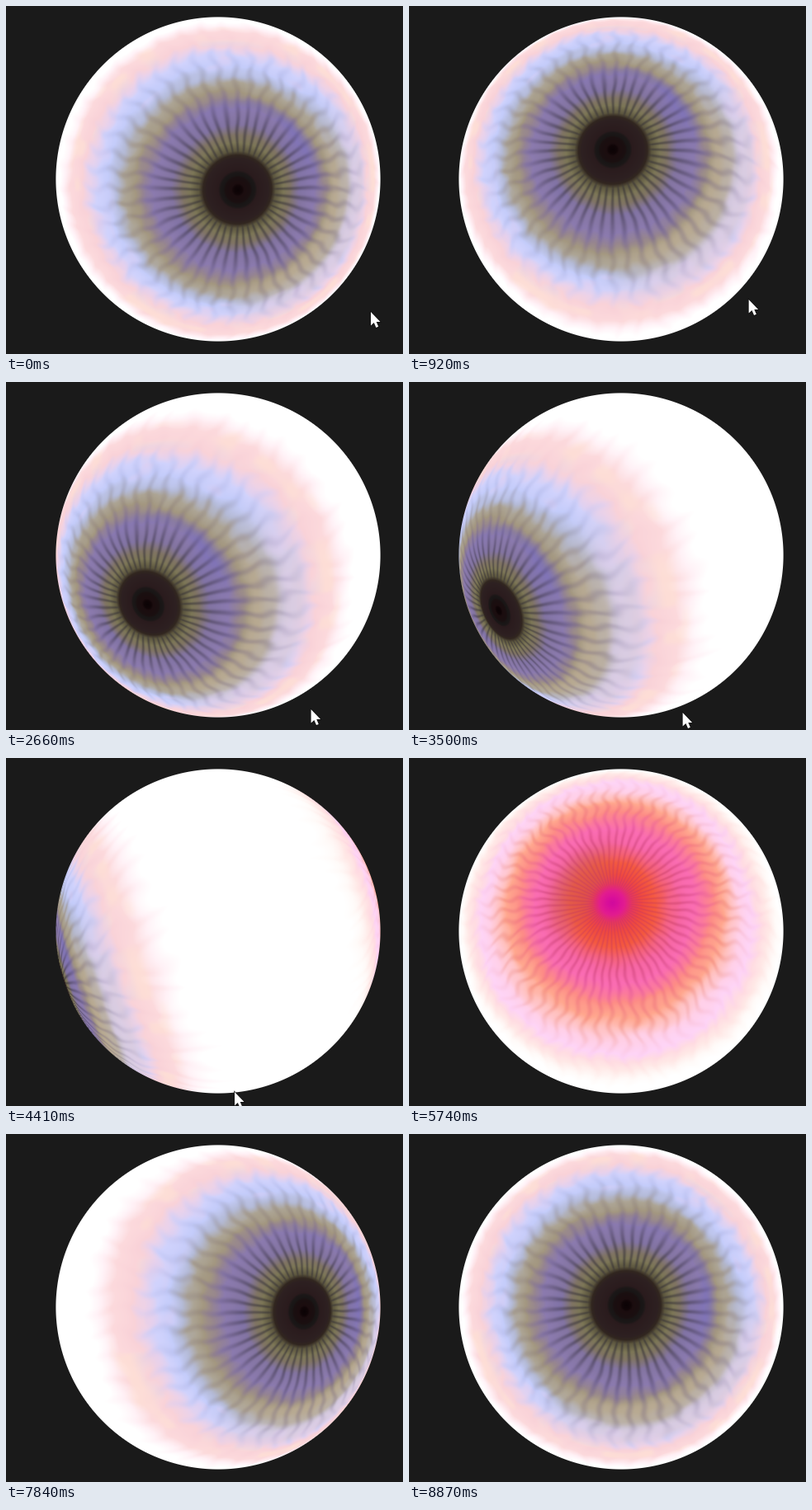
Write an HTML page with a canvas that moves like this. It is 481 by 422 pixels and loops after 9980 ms.

```html
<!DOCTYPE html>
<html lang="en">
<head>
<meta charset="utf-8">
<title>Rotating eye</title>
<style>
html, body { margin: 0; width: 100%; height: 100%; overflow: hidden; background: #1a1a1a; }
canvas { display: block; }
</style>
</head>
<body>
<canvas id="stage" width="481" height="422"></canvas>
<script>
const ctx = document.getElementById('stage').getContext('2d');
const LOOP = 9980, CX = 257, CY = 210, R = 196.6, DIST = 3.4, BG = 26;
const TAN = 1 / Math.sqrt(DIST * DIST - 1);
const X0 = 59, Y0 = 12, SIZE = 397;

// time, yaw, pitch, roll in degrees
const POSES = [[0, 5.2, 2.8, 0], [280, 7.5, 2, 0], [920, -2.1, -7.8, 0], [2660, -19.8, 13.4, 0],
  [4410, -76, 17.6, 8], [5740, -181, 7.5, 20], [7840, -336, 1.2, 32], [8870, -358.6, -0.5, 38]];
// time, x, y of the pointer tip
const POINTER = [[0, 442, 371], [280, 454, 374], [920, 412, 356], [2270, 379, 388],
  [2660, 370, 397], [4410, 277, 405], [5300, 215, 424]];
// start, end, number of picture changes
const SPANS = [[150, 1190, 9], [1340, 2270, 8], [2390, 3380, 8], [3500, 4410, 7], [4560, 5490, 8],
  [5620, 6580, 8], [6700, 7690, 9], [7840, 8230, 4], [8600, 8870, 3]];
const steps = [0];
for (const [a, b, n] of SPANS)
  for (let i = 0; i < n; i++) steps.push(a + (b - a) * i / (n - 1));

const clamp = x => x < 0 ? 0 : x > 1 ? 1 : x;
const ramp = (x, a, b) => { const u = clamp((x - a) / (b - a)); return u * u * (3 - 2 * u); };
const bump = (x, a, b, c, d) => ramp(x, a, b) * (1 - ramp(x, c, d));

// Smooth curve through timed keys
function sample(keys, t) {
  const last = keys.length - 1;
  if (t >= keys[last][0]) return keys[last].slice(1);
  let i = 0;
  while (t >= keys[i + 1][0]) i++;
  const a = keys[i], b = keys[i + 1], h = b[0] - a[0], u = (t - a[0]) / h;
  const slope = (j, c) => {
    const p = keys[Math.max(j - 1, 0)], q = keys[Math.min(j + 1, last)], k = keys[j];
    const s0 = (k[c] - p[c]) / (k[0] - p[0] || 1), s1 = (q[c] - k[c]) / (q[0] - k[0] || 1);
    return s0 * s1 > 0 ? 2 * s0 * s1 / (s0 + s1) : 0;
  };
  const u2 = u * u, u3 = u2 * u;
  return a.slice(1).map((value, j) => {
    const c = j + 1;
    return value * (2 * u3 - 3 * u2 + 1) + b[c] * (3 * u2 - 2 * u3) +
      h * (slope(i, c) * (u3 - 2 * u2 + u) + slope(i + 1, c) * (u3 - u2));
  });
}

// Colour tables indexed by distance from the pole
function palette(text) {
  const stops = text.split(', ').map(s => {
    const [at, hex] = s.split(' '), v = parseInt(hex, 16);
    return [+at, v >> 16, v >> 8 & 255, v & 255];
  });
  const table = new Float32Array(256 * 3);
  for (let x = 0, i = 0; x < 256; x++) {
    while (i < stops.length - 2 && x > stops[i + 1][0]) i++;
    const a = stops[i], b = stops[i + 1], u = clamp((x - a[0]) / (b[0] - a[0]));
    for (let c = 0; c < 3; c++) table[x * 3 + c] = a[c + 1] + (b[c + 1] - a[c + 1]) * u;
  }
  return table;
}
const FRONT = palette('0 0b0305, 5 100507, 8 1b0d0f, 15 1a0f10, 18 191616, 21 1b1717, 24 2a1b1d, 38 2d2021, 42 31261f, ' +
  '47 5c563e, 57 7c7656, 66 807464, 78 8374a0, 98 8b7aae, 109 96858f, 118 a39780, 128 aca494, ' +
  '138 b4bad6, 148 c4ccfa, 158 d0d2fc, 166 ead2ea, 173 f9d2d8, 184 fcd9dc, 190 fff1f6, 194 ffffff');
const BACK = palette('0 d00a9c, 6 d80e9a, 15 e21c8e, 24 e4365e, 36 ee4840, 52 f4593f, 66 f4627c, 78 f666a2, ' +
  '94 fa6cb2, 106 fb7a9c, 116 fd8c86, 130 ffa78e, 140 ffc0bc, 152 ffd0e8, 164 fed4f6, 174 ffdce2, ' +
  '182 ffe8e6, 190 fffaf8, 195 ffffff');

const hash = (x, y) => {
  const s = Math.sin(x * 127.1 + y * 311.7) * 43758.5453;
  return s - Math.floor(s);
};
const W = 64, lattice = Float32Array.from({ length: W * W }, (_, i) => hash(i % W, i / W | 0));
const at = (x, y) => lattice[(y & W - 1) * W + x];

// Value noise, periodic around the pole with n cells
function noise(az, y, n) {
  const x = (az / (2 * Math.PI) + 0.5) * n, xi = Math.floor(x), yi = Math.floor(y);
  let u = x - xi, v = y - yi;
  u *= u * (3 - 2 * u);
  v *= v * (3 - 2 * v);
  const a = xi % n, b = (xi + 1) % n;
  const p = at(a, yi), q = at(a, yi + 1);
  return (p + (at(b, yi) - p) * u) * (1 - v) + (q + (at(b, yi + 1) - q) * u) * v;
}

const col = [0, 0, 0];
function pick(table, q) {
  const i = Math.max(0, Math.min(254, q)), k = i | 0, u = i - k;
  for (let c = 0; c < 3; c++) col[c] = table[k * 3 + c] * (1 - u) + table[k * 3 + 3 + c] * u;
}
function mix(r, g, b, k) {
  col[0] += (r - col[0]) * k;
  col[1] += (g - col[1]) * k;
  col[2] += (b - col[2]) * k;
}

// Dark rays that bend more the further out they run
function spoke(az, r, count, from, amount) {
  const wave = Math.sin(r / 4.8 + 14 * noise(az, 3.5, 13)) * ramp(r, from, 185);
  const drift = noise(az, r / 22 + 40, 20) - 0.5;
  return (0.5 + 0.5 * Math.cos(count * (az + amount * (wave + 1.4 * drift)))) ** 2;
}

function shadeFront(r, az) {
  if (r < 38) return pick(FRONT, r);
  const line = spoke(az, r, 44, 80, 0.03);
  const n = noise(az, r / 9, 50), broad = noise(az, r / 40 + 7, 10);
  const warm = ramp(Math.cos(az - 0.45), 0.25, 0.95);
  const grow = ramp(r, 44, 120) * (1 - 0.6 * ramp(r, 165, 190));
  pick(FRONT, r + grow * ((0.4 - line) * 4 + (n - 0.5) * 7 + (broad - 0.5) * 9));
  mix(112, 106, 196, 0.5 * bump(r, 62, 82, 98, 114) * ramp(broad, 0.4, 0.8));
  mix(188, 172, 146, 0.75 * warm * bump(r, 112, 126, 140, 156));
  mix(222, 202, 214, 0.7 * warm * bump(r, 140, 154, 160, 172));
  mix(255, 228, 208, 0.45 * ramp(n, 0.5, 0.9) * bump(r, 164, 174, 184, 190));
  mix(222, 206, 240, 0.4 * ramp(n, 0.5, 0.9) * bump(r, 138, 148, 170, 180));
  const near = 0.5 * bump(r, 40, 50, 72, 118);
  const far = (0.1 + 0.14 * warm) * bump(r, 76, 104, 130, 180);
  const tone = ramp(r, 50, 130);
  mix(48 + 50 * tone, 44 + 40 * tone, 52 + 80 * tone, line * (near + far));
}

function shadeBack(r, az) {
  const line = spoke(az, r, 58, 40, 0.03);
  const n = noise(az, r / 10 + 20, 44), broad = noise(az, r / 40 + 31, 8);
  const grow = ramp(r, 15, 110) * (1 - 0.5 * ramp(r, 165, 190));
  pick(BACK, r + grow * ((0.4 - line) * 4 + (n - 0.5) * 7 + (broad - 0.5) * 10));
  mix(255, 108, 218, 0.5 * bump(r, 62, 82, 98, 114) * ramp(broad, 0.4, 0.8));
  // Upper left on screen; azimuth runs mirrored on this side
  mix(205, 90, 85, 0.45 * ramp(Math.cos(az + 0.8), 0.2, 1) * bump(r, 20, 34, 62, 90));
  mix(185, 50, 105, line * (0.3 * bump(r, 12, 30, 70, 120) + 0.1 * bump(r, 60, 100, 130, 185)));
}

// View ray hits on the unit sphere, one per pixel
const hits = new Float32Array(SIZE * SIZE * 4);
for (let i = 0; i < SIZE * SIZE; i++) {
  const dx = X0 + i % SIZE + 0.5 - CX, dy = Y0 + (i / SIZE | 0) + 0.5 - CY;
  const len = Math.hypot(dx, dy) || 1e-6, view = Math.atan(Math.min(len / R, 1) * TAN);
  const th = Math.asin(Math.min(1, DIST * Math.sin(view))) - view;
  hits.set([Math.sin(th) * dx / len, Math.sin(th) * dy / len, Math.cos(th), clamp(R - len + 0.5)], i * 4);
}
const image = ctx.createImageData(SIZE, SIZE);

function drawEye(...pose) {
  const [yaw, pitch, roll] = pose.map(deg => deg * Math.PI / 180);
  const sy = Math.sin(yaw), cy = Math.cos(yaw), sp = Math.sin(pitch), cp = Math.cos(pitch);
  const sr = Math.sin(roll), cr = Math.cos(roll);
  const px = image.data;
  for (let i = 0; i < px.length; i += 4) {
    const x = hits[i], y = hits[i + 1], z = hits[i + 2], cover = hits[i + 3];
    col[0] = col[1] = col[2] = 255;
    if (cover > 0) {
      const c = sy * cp * x + sp * y + cy * cp * z, k = Math.abs(c);
      if (k > 1 / DIST) {
        const r = R * Math.sqrt(Math.max(0, 1 - c * c)) / (DIST - k) / TAN;
        const right = cy * x - sy * z, down = cp * y - sp * (sy * x + cy * z);
        const az = Math.atan2(down * cr - right * sr, right * cr + down * sr);
        (c > 0 ? shadeFront : shadeBack)(r, az);
      }
    }
    for (let j = 0; j < 3; j++) px[i + j] = BG + (col[j] - BG) * cover;
    px[i + 3] = 255;
  }
  ctx.putImageData(image, X0, Y0);
}

const arrow = new Path2D('M0 0V16.5L3.8 13L6.4 19L9.2 17.8L6.7 12H11.5Z');
function drawPointer(x, y) {
  ctx.save();
  ctx.translate(x, y);
  ctx.lineWidth = 1.4;
  ctx.strokeStyle = '#111';
  ctx.stroke(arrow);
  ctx.fillStyle = '#fff';
  ctx.fill(arrow);
  ctx.restore();
}

function draw(t) {
  ctx.fillStyle = '#1a1a1a';
  ctx.fillRect(0, 0, 481, 422);
  drawEye(...sample(POSES, t));
  if (t < 5300) drawPointer(...sample(POINTER, t));
}

let shown = -1;
function tick() {
  const t = performance.now() % LOOP + 20;
  let i = steps.length - 1;
  while (i > 0 && steps[i] > t) i--;
  if (i !== shown) draw(steps[shown = i]);
  requestAnimationFrame(tick);
}
tick();
</script>
</body>
</html>
```
